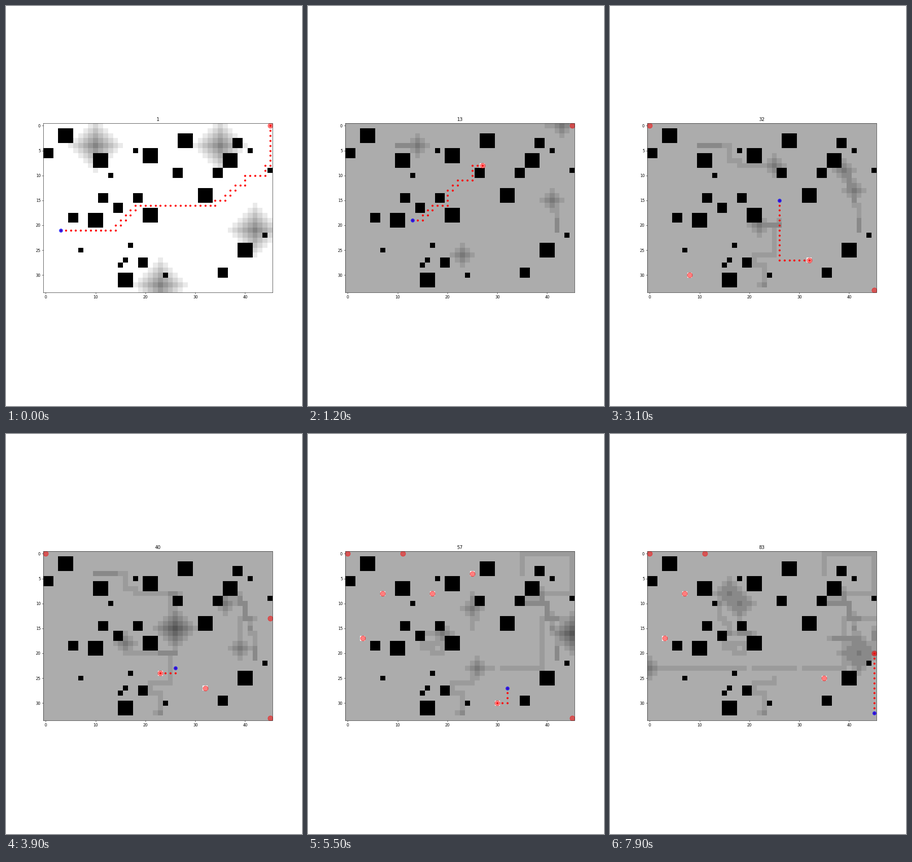
A matplotlib script that plays this animation: 643 by 870 pixels, repeating every 8 s.

```python
import numpy as np
import matplotlib.pyplot as plt
from matplotlib.animation import FuncAnimation

W, H, DPI = 643, 870, 60
COLS, ROWS, FRAMES = 46, 34, 80
PX = 72 / DPI  # points per pixel
GRAY_FROM, FLAT_FROM = 8, 76  # changes of shading

# top left corners of the square walls, by side length
WALLS = {
    3: [(3, 1), (10, 6), (20, 5), (27, 2), (36, 6), (31, 13), (20, 17),
        (9, 18), (39, 24), (15, 30)],
    2: [(0, 5), (38, 3), (26, 9), (34, 9), (11, 14), (18, 14), (14, 16),
        (5, 18), (19, 27), (35, 29)],
    1: [(18, 5), (41, 5), (13, 10), (45, 9), (7, 25), (17, 24), (16, 27),
        (15, 28), (24, 30), (44, 22)],
}

# goal cell: frame at which it appears
GOALS = {
    (45, 0): 0, (27, 8): 8, (8, 30): 16, (45, 33): 21, (0, 0): 25,
    (32, 27): 27, (45, 13): 33, (23, 24): 37, (7, 8): 42, (17, 8): 45,
    (25, 4): 47, (3, 17): 50, (30, 30): 52, (11, 0): 55, (45, 20): 62,
    (35, 25): 74,
}
EXPIRES = {(8, 30): 32}


def walk(*points):
    """Unit steps between points: stairs while both axes differ, else straight.
    A repeated point is a pause."""
    cells = [points[0]]
    for x, y in points[1:]:
        cx, cy = cells[-1]
        if (cx, cy) == (x, y):
            cells.append((x, y))
        while (cx, cy) != (x, y):
            if cy != y:
                cy += 1 if y > cy else -1
                cells.append((cx, cy))
            if cx != x:
                cx += 1 if x > cx else -1
                cells.append((cx, cy))
    return cells


# planned routes, by the frame at which each is taken up
PLANS = {
    0: walk((3, 21), (14, 21), (18, 16), (34, 16), (36, 15), (38, 12),
            (40, 12), (40, 10), (44, 10), (44, 8), (45, 8), (45, 0)),
    8: walk((11, 21), (13, 21), (13, 19), (15, 19), (17, 16), (20, 16),
            (20, 14), (22, 11), (25, 11), (25, 8), (27, 8)),
    22: walk((20, 16), (22, 13), (25, 13), (25, 8), (27, 8)),
    26: walk((22, 14), (26, 14), (26, 27), (32, 27)),
    37: walk((26, 21), (26, 24), (23, 24)),
    43: walk((23, 24), (23, 27), (32, 27)),
    55: walk((32, 27), (32, 30), (30, 30)),
    60: walk((30, 30), (30, 33), (45, 33)),
    78: walk((45, 33), (45, 20)),
}


def step_of(i):
    """Step counter: one count is passed over at three moments."""
    return 1 + i + (i >= 52) + (i >= 61) + (i >= 79)


def plan(i):
    start = max(k for k in PLANS if k <= i)
    return PLANS[start][i - start:]


class Mover:
    """peaks: frames at which the halo is widest;
    hidden: (first frame, end frame, first step, last step) of unseen trail."""

    def __init__(self, route, peaks=(), hidden=()):
        self.route, self.peaks, self.hidden = route, peaks, hidden

    def cell(self, i):
        return self.route[min(step_of(i), len(self.route)) - 1]

    def size(self, i):
        swell = max((2 - abs(i - p) / 3 for p in self.peaks), default=0)
        return max(2 + max(0, round(swell)), 5 - i // 3)

    def trail(self, i):
        gone = [(a, b) for f, g, a, b in self.hidden if f <= i < g]
        for k in range(i + 1):
            if not any(a <= step_of(k) <= b for a, b in gone):
                yield self.cell(k)


MOVERS = [
    Mover(walk((10, 4), (14, 4), (10, 4), (16, 4), (16, 7), (18, 7), (18, 8),
               (27, 8), (25, 8), (25, 11), (26, 11), (26, 15), (25, 15),
               (25, 8), (25, 13), (26, 13), (26, 11), (25, 11), (25, 4),
               (23, 4), (23, 8), (21, 8), (21, 9), (18, 9), (18, 12),
               (18, 10)),
          peaks=(39, 70, 77),
          hidden=((45, 80, 1, 40), (62, 80, 41, 56), (75, 80, 57, 75))),
    Mover(walk((35, 4), (35, 0), (45, 0), (45, 8), (39, 8), (39, 7), (39, 9),
               (36, 9), (36, 10), (38, 10), (36, 10), (40, 10), (40, 12),
               (41, 12), (41, 13), (45, 13), (45, 17), (45, 16), (45, 20),
               (43, 20), (43, 17), (36, 17), (42, 17), (42, 20)),
          peaks=(55, 70, 79),
          hidden=((0, 14, 1, 9), (31, 44, 1, 32))),
    Mover(walk((42, 21), (42, 21), (42, 19), (42, 21), (42, 16), (41, 16),
               (41, 15), (41, 15), (41, 13), (40, 13), (40, 10), (39, 10),
               (39, 8), (39, 10), (40, 10), (40, 13), (42, 13), (39, 13),
               (39, 23), (0, 23))),
    Mover(walk((23, 32), (22, 32), (23, 32), (23, 28), (21, 28), (21, 26),
               (25, 26), (25, 20), (23, 20), (26, 20), (26, 19), (26, 20),
               (16, 20), (16, 18), (15, 18), (15, 19), (17, 19), (17, 20),
               (19, 20), (19, 18), (16, 18), (16, 16), (21, 16), (19, 16),
               (16, 16), (16, 14), (15, 14), (15, 13), (14, 13), (14, 10),
               (15, 10), (14, 10), (14, 8), (18, 8), (16, 8)),
          peaks=(76,),
          hidden=((0, 14, 1, 12), (45, 80, 17, 40))),
]


def last_frame(goal):
    """A goal goes when the agent or a mover steps on it."""
    for i in range(GOALS[goal], FRAMES):
        if goal in [plan(i)[0]] + [m.cell(i) for m in MOVERS]:
            return i
    return EXPIRES.get(goal, FRAMES)


ENDS = {goal: last_frame(goal) for goal in GOALS}

YY, XX = np.mgrid[:ROWS, :COLS]
WALL = np.zeros((ROWS, COLS), bool)
for side, corners in WALLS.items():
    for x, y in corners:
        WALL[y:y + side, x:x + side] = True


def grid(i, goals):
    level = np.zeros((ROWS, COLS), int)
    for m in MOVERS:
        for x, y in m.trail(i):
            level[y, x] += 1
    level = np.minimum(level, 2)
    for m in MOVERS:
        x, y = m.cell(i)
        dist = abs(XX - x) + abs(YY - y)
        halo = m.size(i) + 1 - dist
        if i >= FLAT_FROM:
            halo = np.where(dist == 0, 3, np.minimum(halo, 2))
        level = np.maximum(level, halo)
    shade = 255 - 20.4 * level if i < GRAY_FROM else 172.5 - 17.4 * level
    for x, y in goals:
        if 0 < x < COLS - 1 and 0 < y < ROWS - 1 and level[y, x] == 0:
            shade[y, x] = 255
    shade[WALL] = 0
    return np.repeat(shade[..., None], 3, axis=2).astype(np.uint8)


fig = plt.figure(figsize=((W + .01) / DPI, (H + .01) / DPI), dpi=DPI,
                 facecolor="white")
ax = fig.add_axes((81 / W, 247 / H, 497.99 / W, 367.99 / H))
image = ax.imshow(np.zeros((ROWS, COLS, 3), np.uint8), aspect="auto",
                  interpolation="nearest")
title = ax.set_title("1")
ax.set_xticks(range(0, 41, 10))
ax.set_yticks(range(0, 31, 5))


def dots(size, color, **kw):
    return ax.plot([], [], "o", ms=size * PX, color=color, **kw)[0]


goal_dots = dots(11, "red", alpha=.5, mew=PX, zorder=2)
path_dots = dots(4.4, "red", mew=0, zorder=2.1)
agent = dots(8.6, "blue", alpha=.75, mew=0, zorder=2.2)


def draw(i):
    goals = [g for g in GOALS if GOALS[g] <= i < ENDS[g]]
    path = plan(i)
    image.set_data(grid(i, goals))
    goal_dots.set_data(*zip(*goals))
    path_dots.set_data(*zip(*path))
    agent.set_data(*zip(path[0]))
    title.set_text(str(step_of(i)))
    return image, goal_dots, path_dots, agent, title


anim = FuncAnimation(fig, draw, frames=FRAMES, interval=100, repeat=True,
                     repeat_delay=0, blit=False)
plt.show()
```
